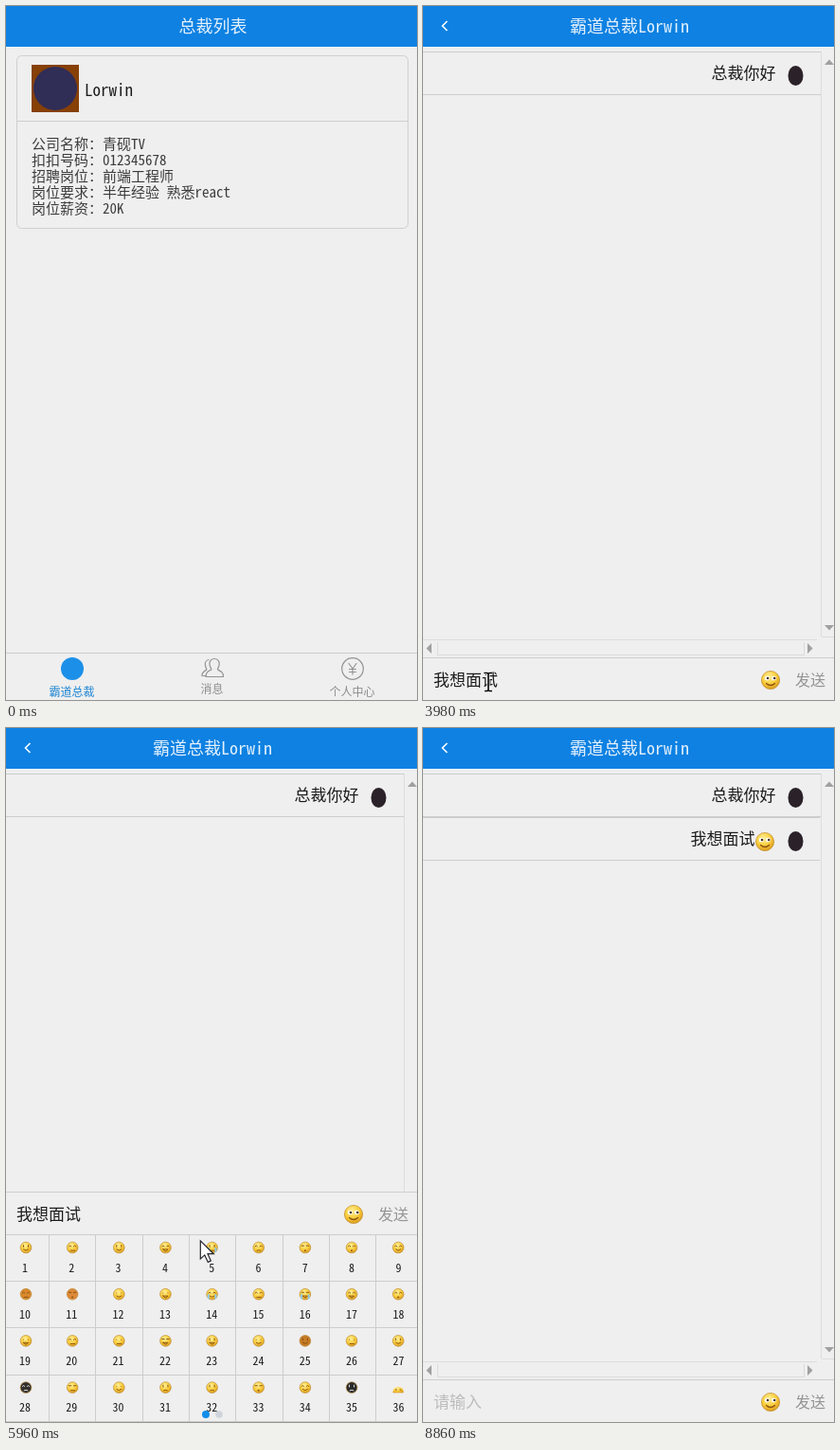
Recreate the animation shown at these times as an HTML page. Size 434 by 732 pixels, loop 9020 ms.

```html
<!DOCTYPE html>
<html lang="zh-CN">
<head>
<meta charset="utf-8">
<title>总裁列表</title>
<style>
  html, body { margin: 0; width: 100%; height: 100%; overflow: hidden; background: #efefef; }
  svg { display: block; width: 434px; height: 732px; }
  text {
    font-family: "Noto Sans Mono CJK SC", "Noto Sans CJK SC", "Noto Sans CJK", "Liberation Mono", monospace;
    font-weight: 300; white-space: pre;
  }
  .title { font-size: 18px; fill: #e4f1fc; text-anchor: middle; }
  .msg { font-size: 17px; fill: #1c1c1c; }
  .body { font-size: 15px; fill: #3c3c3c; }
  .tab { font-size: 12px; fill: #8c8c8c; text-anchor: middle; }
  .num { font-size: 12px; fill: #1c1c1c; text-anchor: middle; }
  .line { fill: none; stroke: #cdcdcd; shape-rendering: crispEdges; }
  .faint { fill: none; stroke: #dcdcdc; shape-rendering: crispEdges; }
  .arrow { fill: #a0a0a0; }
  .icon { fill: none; stroke: #949494; stroke-width: 1.2; stroke-linejoin: round; stroke-linecap: round; }
</style>
</head>
<body>
<svg viewBox="0 0 434 732">
  <defs>
    <radialGradient id="gold" cx=".42" cy=".32" r=".72">
      <stop offset="0" stop-color="#fff09a"/>
      <stop offset=".55" stop-color="#f9cd3c"/>
      <stop offset="1" stop-color="#d8951a"/>
    </radialGradient>
    <g id="eyesOpen">
      <ellipse cx="-3.6" cy="-2" rx="2.6" ry="2.3" fill="#fff"/>
      <ellipse cx="3.6" cy="-2" rx="2.6" ry="2.3" fill="#fff"/>
      <circle cx="-3" cy="-2" r="1.3" fill="#4a3010"/>
      <circle cx="4.2" cy="-2" r="1.3" fill="#4a3010"/>
    </g>
    <path id="eyesShut" d="M-6-2Q-3.5 0-1-2M1.500-2Q4 0 6.500-2" fill="none" stroke="#6b4210" stroke-width="1.4"/>
    <g id="smile">
      <circle r="9.6" fill="url(#gold)" stroke="#c08c2a" stroke-width=".7"/>
      <path d="M-4.500 3.500Q0 7.500 4.500 3.500" fill="none" stroke="#8a520f" stroke-width="1.2" stroke-linecap="round"/>
      <use href="#eyesOpen"/>
      <use href="#eyesShut"/>
    </g>
    <ellipse id="avatar" rx="8" ry="10.500" fill="#2b2229"/>
    <g id="header">
      <rect width="434" height="43" fill="#0e81e2"/>
      <rect y="43" width="434" height="1" fill="#fafafa"/>
    </g>
  </defs>

  <rect width="434" height="732" fill="#efefef"/>

  <g id="list">
    <use href="#header"/>
    <text class="title" x="218.5" y="27.5">总裁列表</text>
    <rect x="11.5" y="52.5" width="413" height="182" rx="5" fill="none" stroke="#cfcfcf"/>
    <path class="line" d="M12 121.5H425"/>
    <rect x="27" y="62" width="50" height="50" fill="#874006"/>
    <circle cx="52" cy="87" r="23" fill="#302d57"/>
    <text class="msg" x="83" y="95">Lorwin</text>
    <g class="body">
      <text x="27" y="150.5">公司名称：青砚TV</text>
      <text x="27" y="167.5">扣扣号码：012345678</text>
      <text x="27" y="184.5">招聘岗位：前端工程师</text>
      <text x="27" y="201.5">岗位要求：半年经验 熟悉react</text>
      <text x="27" y="218.5">岗位薪资：20K</text>
    </g>
    <path class="line" d="M0 682.5H434"/>
    <circle cx="70" cy="699" r="12" fill="#1c90e8"/>
    <g class="icon">
      <path d="M214 689.5a4.4 4.4 0 0 0-3.6 5c0 3 1.5 4.5 1.5 5.5-2.7 1.7-5.2 2.6-5 6.5H211"/>
      <path d="M220 688.5a5 5 0 0 0-5 5.5c0 3 2 4.5 1.8 6-3 1.7-5.8 2.5-5.8 7.5H229.5c0-5-3-5.8-6-7.5-.2-1.5 1.7-3 1.7-6a5 5 0 0 0-5.2-5.5z"/>
      <circle cx="366" cy="699" r="11.3"/>
      <path d="M362 693.5l4 5.5 4-5.5M366 699v6M362.5 699.5h7M362.5 702.5h7"/>
    </g>
    <text class="tab" x="69.5" y="728" style="fill:#1c84d2">霸道总裁</text>
    <text class="tab" x="217.5" y="725">消息</text>
    <text class="tab" x="365.5" y="728">个人中心</text>
  </g>

  <g id="chat">
    <use href="#header"/>
    <path d="M25.5 16L20.5 21 25.5 26" fill="none" stroke="#fff" stroke-width="1.6"/>
    <text class="title" x="218" y="27.5">霸道总裁Lorwin</text>

    <path class="line" d="M0 48.5H420M0 93.5H420"/>
    <text class="msg" x="304.5" y="77">总裁你好</text>
    <use href="#avatar" x="393.5" y="73.5"/>
    <g id="sent">
      <path class="line" d="M0 94.5H419M0 139.5H419"/>
      <text class="msg" x="282.5" y="122.5">我想面试</text>
      <use href="#smile" x="361" y="120"/>
      <use href="#avatar" x="393.5" y="119.5"/>
    </g>

    <path class="faint" d="M420.5 48V665M421 665.5H434M0 668.5H416M15.5 671V684.5H402.5V671"/>
    <path class="arrow" d="M424 62l5-5.5 5 5.5zM424 653l5 5.5 5-5.5zM9 672v11l-5.5-5.5zM406 672v11l5.5-5.5z"/>

    <g id="bar">
      <rect y="687" width="434" height="245" fill="#efefef"/>
      <path class="line" d="M0 687.5H434"/>
      <text id="hint" class="msg" x="11" y="717" style="fill:#bcbcbc">请输入</text>
      <text id="draft" class="msg" x="11" y="717">我想面试</text>
      <rect id="caret" y="702" width="1" height="17" fill="#000"/>
      <use href="#smile" x="367" y="711"/>
      <text x="393" y="717" font-size="16" fill="#949494">发送</text>
    </g>

    <g id="panel">
      <g id="faces"></g>
      <circle cx="211" cy="724" r="4" fill="#108ee9"/>
      <circle cx="225" cy="724" r="3.8" fill="#cfd3dc"/>
    </g>
  </g>

  <g id="pointer">
    <path id="tip" d="M.5.5V19.5L5 15.5 8.5 23 11.5 21.6 8.2 14.3H14.5z" fill="#fff" stroke="#24242c" stroke-width="1.2"/>
    <g id="beam" fill="none">
      <path d="M-4-9.5H4M0-9.5V9.5M-4 9.5H4" stroke="#fff" stroke-width="3"/>
      <path d="M-4-9.5H-1L0-8.5 1-9.5H4M0-9V9M-4 9.5H-1L0 8.5 1 9.5H4" stroke="#000" stroke-width="1.6"/>
    </g>
  </g>
</svg>

<script>
const LOOP = 9020, CELL = 49.3, BAR_LIFT = 198;
const OPEN_CHAT = 520, TYPED = 3640, OPEN_PANEL = 5020, SEND = 6300;
const CARET_STEP = 340, BLINK_EVERY = 993.3, BLINK_FOR = 40;
const $ = id => document.getElementById(id);
const show = (id, on) => $(id).style.display = on ? '' : 'none';
const within = (t, from, to) => t >= from && t < to;

// Pointer stops: time, x, y
const route = [
  [60, 250, -30], [460, 150, 165], [760, 165, 180], [900, 165, 180],
  [1380, 69, 713], [4040, 69, 713], [4400, 396, 706], [4740, 366, 710],
  [5040, 366, 710], [5500, 20, 557], [5700, 20, 557], [6240, 409, 522],
  [6460, 409, 522], [6760, 350, 640], [6860, 350, 640], [7620, 201, 721],
  [7720, 190, 718], [8320, 190, 718], [8860, 290, -30]
];

function pointerAt(t) {
  const i = route.findIndex(stop => stop[0] > t);
  if (i < 1) return [0, -40];
  const [t0, x0, y0] = route[i - 1], [t1, x1, y1] = route[i];
  const p = (t - t0) / (t1 - t0), e = p * p * (3 - 2 * p);
  return [x0 + (x1 - x0) * e, y0 + (y1 - y0) * e];
}

const caretOn = (t, from, to) =>
  within(t, from, to) && Math.floor((t - from) / CARET_STEP) % 2 === 0;

function buildPanel() {
  const mouths = ['M-4 3Q0 7 4 3', 'M-3 5Q0 3 3 5', 'M-4 3H4Q0 9-4 3z', 'M-3 5H4', 'M-1 5a1 1 0 1 0 2 0a1 1 0 1 0-2 0'];
  const eyes = ['M-4-4v3M4-4v3', 'M-6-2Q-4-5-2-2M2-2Q4-5 6-2', 'M-6-3H-2M2-3H6', 'M-4-2v.1M4-2v.1'];
  const tints = { 10: '#d98a2e', 11: '#dd8a38', 25: '#c67a26', 28: '#33302c', 35: '#2b2b2b' };
  const tears = [5, 14, 16];
  let seed = 7, html = '', grid = '';
  const pick = list => {
    seed = (seed * 16807) % 2147483647;
    return list[seed % list.length];
  };
  for (let n = 1; n <= 36; n++) {
    const col = (n - 1) % 9, row = Math.floor((n - 1) / 9);
    const x = 21 + col * 49.15, y = 548 + row * 49.2;
    const look = n === 1 ? eyes[0] + mouths[0] : pick(eyes) + pick(mouths);
    const ink = n === 28 || n === 35 ? '#eee' : '#87500f';
    const face = n === 36
      ? '<path d="M-9 9Q-9-1 0-1T9 9z" fill="url(#gold)"/><path d="M-5 4h3M2 4h3" stroke="#87500f" stroke-width="1.6"/>'
      : `<circle r="9.3" fill="${tints[n] || 'url(#gold)'}" stroke="#b98a35"/>
         <path d="${look}" fill="none" stroke="${ink}" stroke-width="1.5" stroke-linecap="round"/>`;
    const tear = tears.includes(n) ? '<path d="M-6 0v8M6 0v8" stroke="#8accea" stroke-width="3"/>' : '';
    html += `<g transform="translate(${x} ${y}) scale(.63)">${face}${tear}</g>
      <text class="num" x="${20 + col * CELL}" y="${574 + row * 49}">${n}</text>`;
  }
  for (let i = 0; i < 8; i++) grid += `M${Math.floor(45.5 + i * CELL) + .5} 534V732`;
  for (let i = 0; i < 5; i++) grid += `M0 ${Math.floor(534.2 + i * CELL) + .5}H434`;
  $('faces').innerHTML = `<path class="line" d="${grid}"/>` + html;
}

function render(now) {
  const t = now % LOOP;
  const chatting = t >= OPEN_CHAT, lifted = within(t, OPEN_PANEL, SEND), typed = within(t, TYPED, SEND);

  show('list', !chatting);
  show('chat', chatting);
  show('sent', t >= SEND);
  show('panel', lifted);
  show('draft', typed);
  show('hint', !typed);
  $('bar').setAttribute('transform', `translate(0 ${lifted ? -BAR_LIFT : 0})`);

  show('caret', caretOn(t, 1380, TYPED) || caretOn(t, TYPED, OPEN_PANEL) || caretOn(t, 7820, LOOP));
  $('caret').setAttribute('x', typed ? 79 : 11);

  const blink = (t + 920) % BLINK_EVERY < BLINK_FOR;
  show('eyesOpen', !blink);
  show('eyesShut', blink);

  const [x, y] = pointerAt(t);
  const overInput = chatting && !lifted && y > 690 && x < 350;
  $('pointer').setAttribute('transform', `translate(${x.toFixed(1)} ${y.toFixed(1)})`);
  show('beam', overInput);
  show('tip', !overInput);

  requestAnimationFrame(render);
}

buildPanel();
render(performance.now());
</script>
</body>
</html>
```
